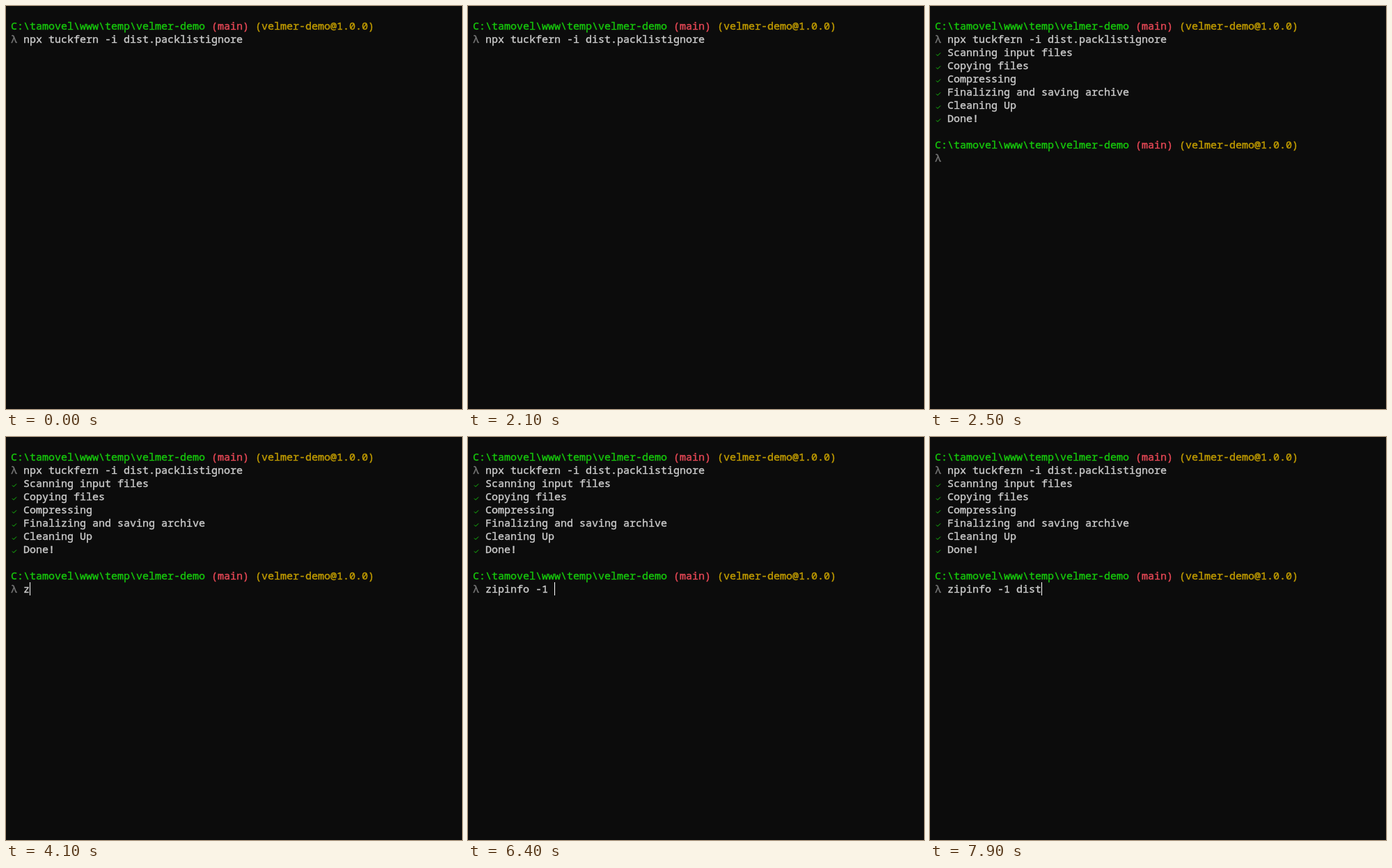
Animation of 655 by 580 pixels, one loop 8000 ms. Source, as an HTML page:

```html
<!DOCTYPE html>
<html lang="en">
<head>
<meta charset="utf-8">
<title>Terminal session</title>
<style>
  html, body { margin: 0; width: 100%; height: 100%; overflow: hidden; background: #0c0c0c; }
  svg { display: block; }
  text {
    font: 15px "Noto Sans Mono", "DejaVu Sans Mono", monospace;
    font-variant-ligatures: none; white-space: pre;
    fill: currentColor; stroke: currentColor; stroke-width: 0.4px;
  }
</style>
</head>
<body>
<svg id="stage" width="655" height="580" viewBox="0 0 655 580"></svg>
<script>
const LOOP = 8000;
const CELL = 9, ROW = 19, LEFT = 7, TOP = 19, BASELINE = 15;
const GREEN = '#16c60c', RED = '#e74856', GOLD = '#c19c00', GRAY = '#767676', LIGHT = '#cccccc';

const COMMAND = 'npx tuckfern -i dist.packlistignore';
const TYPED = 'zipinfo -1 dist';
const TASKS = ['Scanning input files', 'Copying files', 'Compressing',
  'Finalizing and saving archive', 'Cleaning Up', 'Done!'];
const PROMPT_ROW = TASKS.length + 3;
const INPUT_ROW = PROMPT_ROW + 1;

// [start ms, finished tasks]
const PROGRESS = [[0, 0], [2200, 1], [2300, 3], [2400, 6]];
const PROMPT_AT = 2500;
// [start ms, typed characters]
const TYPING = [[0, 0], [4100, 1], [4400, 3], [4600, 4], [5000, 5], [5100, 6], [5300, 7], [5500, 8],
  [6000, 9], [6200, 10], [6400, 11], [7500, 12], [7700, 13], [7800, 14], [7900, 15]];
// The cursor starts hidden and flips at each of these times.
const BLINKS = [100, 1000, 1500, 2100, 2600, 3100, 3600, 5400, 5500, 7000, 7500];
const ENTER_AT = 500;

const stage = document.getElementById('stage');
const colX = col => LEFT + col * CELL;
const rowY = row => TOP + row * ROW;

function add(tag, attrs, parent = stage) {
  const node = document.createElementNS('http://www.w3.org/2000/svg', tag);
  for (const name in attrs) node.setAttribute(name, attrs[name]);
  return parent.appendChild(node);
}

function write(row, col, string, color, parent) {
  const node = add('text', { x: colX(col), y: rowY(row) + BASELINE, color }, parent);
  node.textContent = string;
  return node;
}

function prompt(row) {
  const group = add('g');
  write(row, 0, 'C:\\tamovel\\www\\temp\\velmer-demo', GREEN, group);
  write(row, 32, '(main)', RED, group);
  write(row, 39, '(velmer-demo@1.0.0)', GOLD, group);
  write(row + 1, 0, 'λ', GRAY, group);
  return group;
}

function task(label, index) {
  const group = add('g');
  const row = index + 2;
  add('path', {
    d: `M${LEFT + 2} ${rowY(row) + 12.5}l2 2l4-4`,
    fill: 'none', stroke: GREEN
  }, group);
  write(row, 2, label, LIGHT, group);
  return group;
}

prompt(0);
write(1, 2, COMMAND, LIGHT);
const tasks = TASKS.map(task);
const nextPrompt = prompt(PROMPT_ROW);
const input = write(INPUT_ROW, 2, '', LIGHT);
const cursor = add('rect', { width: 1, height: ROW, fill: '#fff' });

const valueAt = (steps, t) => steps.filter(([start]) => start <= t).pop()[1];
const show = (node, on) => node.setAttribute('visibility', on ? 'visible' : 'hidden');

function cursorCell(t, typed) {
  if (t < ENTER_AT) return [1, COMMAND.length + 3];
  if (t < PROMPT_AT) return [2, 0];
  return [INPUT_ROW, typed + 2];
}

function render(t) {
  const done = valueAt(PROGRESS, t);
  const typed = valueAt(TYPING, t);
  tasks.forEach((node, i) => show(node, i < done));
  show(nextPrompt, t >= PROMPT_AT);
  input.textContent = TYPED.slice(0, typed);

  const [row, col] = cursorCell(t, typed);
  cursor.setAttribute('x', colX(col));
  cursor.setAttribute('y', rowY(row));
  show(cursor, BLINKS.filter(time => time <= t).length % 2);
}

function frame() {
  render(performance.now() % LOOP);
  requestAnimationFrame(frame);
}
frame();
</script>
</body>
</html>
```
